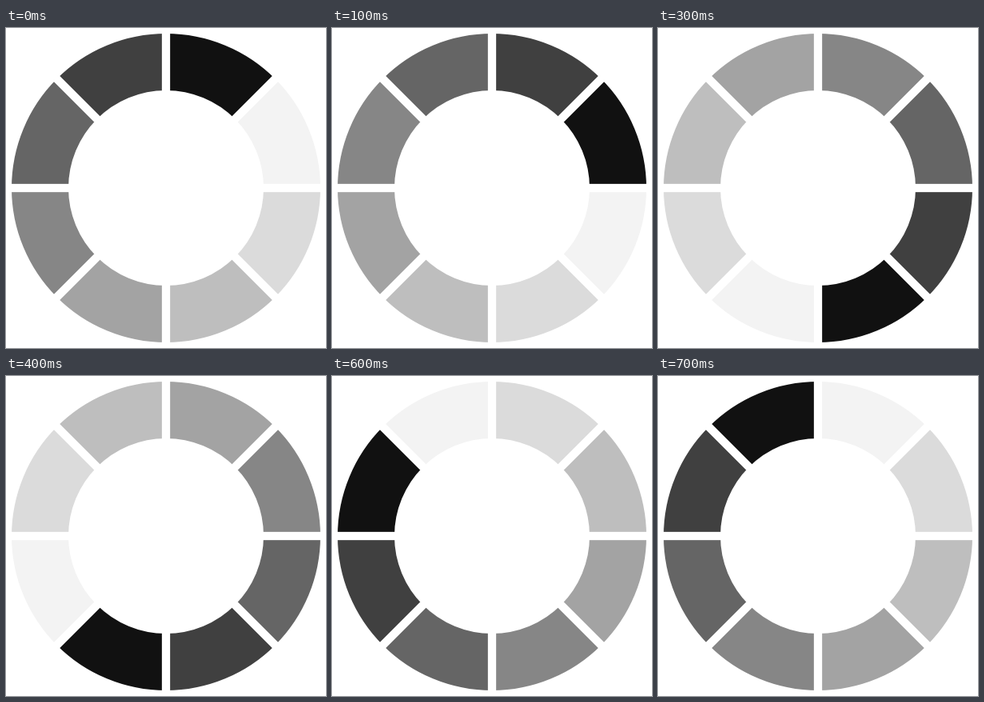
Animation of 400 by 400 pixels, one loop 800 ms. Source, as an HTML page with a canvas:

```html
<!DOCTYPE html>
<html lang="en">
<head>
<meta charset="utf-8">
<title>Ring spinner</title>
<style>
html, body { margin: 0; height: 100%; overflow: hidden; background: #fff; }
canvas { display: block; width: 400px; height: 400px; }
</style>
</head>
<body>
<canvas width="400" height="400"></canvas>
<script>
const ctx = document.querySelector('canvas').getContext('2d');
const COUNT = 8, STEP_MS = 100, TURN = Math.PI / 4;
const INNER = 122, OUTER = 193, GAP = 10.3;
// Grey levels from the leading segment back along the tail
const greys = [17, 64, 101, 134, 163, 190, 219, 243];

function draw(step) {
  ctx.setTransform(1, 0, 0, 1, 0, 0);
  ctx.fillStyle = '#fff';
  ctx.fillRect(0, 0, 400, 400);
  ctx.translate(200, 200);

  ctx.lineWidth = OUTER - INNER;
  for (let i = 0; i < COUNT; i++) {
    const g = greys[(step - i + COUNT) % COUNT];
    const start = i * TURN - Math.PI / 2;
    ctx.strokeStyle = `rgb(${g},${g},${g})`;
    ctx.beginPath();
    ctx.arc(0, 0, (INNER + OUTER) / 2, start, start + TURN);
    ctx.stroke();
  }

  for (let i = 0; i < COUNT / 2; i++) {
    ctx.fillRect(-200, -GAP / 2, 400, GAP);
    ctx.rotate(TURN);
  }
}

const start = performance.now();
function tick() {
  draw(Math.floor((performance.now() - start) / STEP_MS) % COUNT);
  requestAnimationFrame(tick);
}
tick();
</script>
</body>
</html>
```
